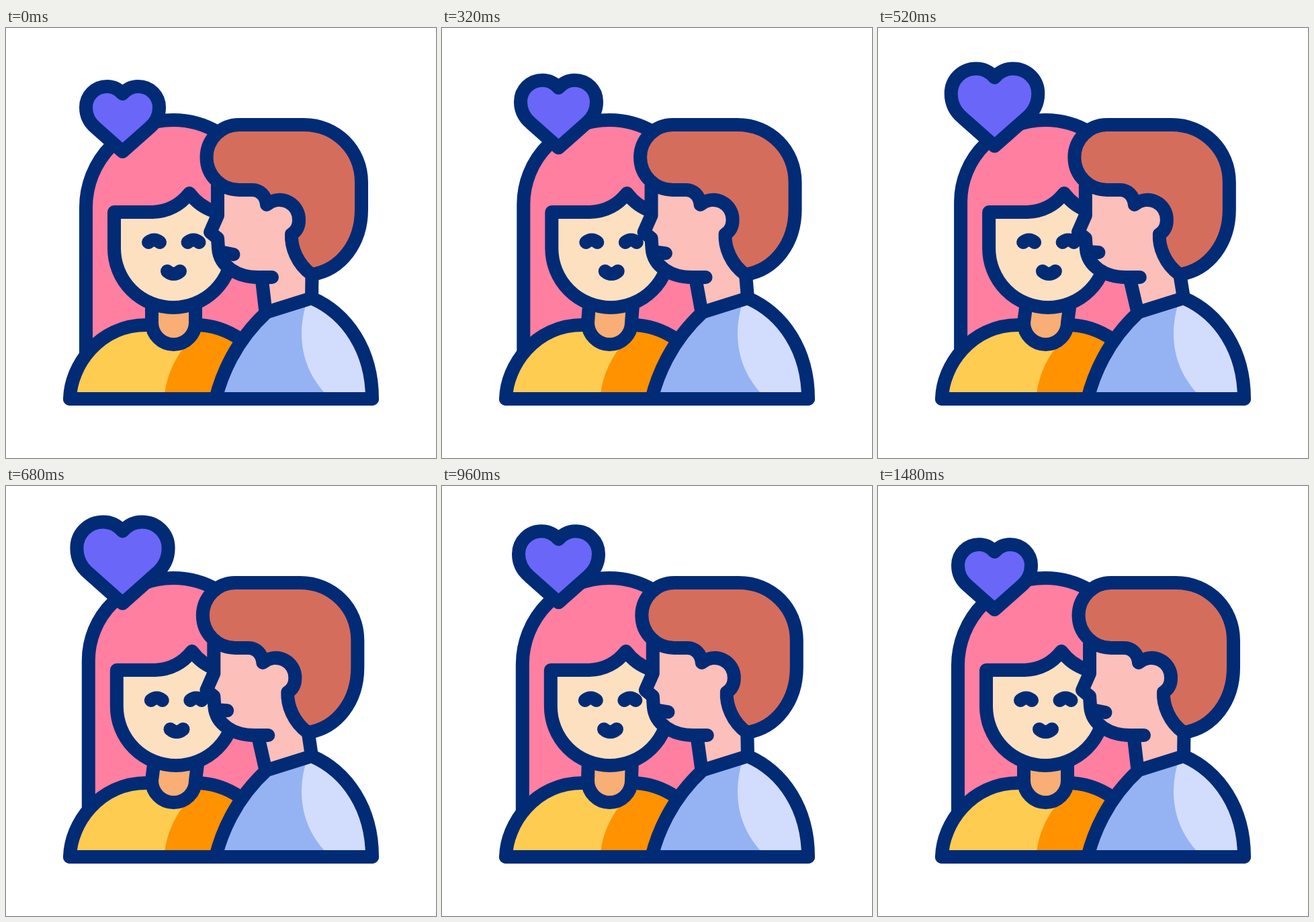
Write an HTML page with a canvas that moves like this. It is 640x640 px and loops after 1.64 s.

```html
<!DOCTYPE html>
<html lang="en">
<head>
<meta charset="utf-8">
<title>Couple</title>
<style>
html, body { margin: 0; overflow: hidden; background: #fff; }
canvas { display: block; }
</style>
</head>
<body>
<canvas width="640" height="640"></canvas>
<script>
const LOOP = 1640;
const ctx = document.querySelector('canvas').getContext('2d');

const HEART = new Path2D(`M0-86 C-6-93-14-97-23-97 C-41-97-54.5-83-54.5-66
  C-54.5-53-49-43-40-35.5 L0 0 L40-35.5 C49-43 54.5-53 54.5-66
  C54.5-83 41-97 23-97 C14-97 6-93 0-86Z`);
const SHIRT = 'M95 552 C96 503 138 442 209 442 H282 C308 442 330 450 350 464';
const FACE = `M161 274 H218 C245 273 262 260 273 246 C282 258 295 268 310 273
  L337 328 A88 88 0 0 1 161 328Z`;
const NOSE_AND_CHIN = 'L304 304 L315 313 L316 328 C318 355 345 371 375 371 H396';
const EAR = 'C433 351 424 326 425 307 C433 302 436 294 436 286 A29 29 0 0 0 388 263';
const MAN_HAIR = `M347 241 A48.5 48.5 0 0 1 347 144 H443 C492 144 529 182 529 230
  V270 C529 320 499 360 455 367 ${EAR} C387 249 377 241 367 241Z`;
const JACKET = `M312 552 C320 519 340 467 388 423 L455 402
  C508 425 545 480 545 552Z`;

const ease = x => (1 - Math.cos(Math.PI * Math.min(1, Math.max(0, x)))) / 2;
// Rises from start to peak, then returns to zero at end.
const pulse = (t, start, peak, end) =>
  t < peak ? ease((t - start) / (peak - start)) : ease((end - t) / (end - peak));

const path = d => d instanceof Path2D ? d : new Path2D(d);
function fill(d, color) {
  ctx.fillStyle = color;
  ctx.fill(path(d));
}
function line(d) {
  ctx.stroke(path(d));
}
function shape(d, color) {
  fill(d, color);
  line(d);
}
function shifted(dx, draw) {
  ctx.save();
  ctx.translate(dx, 0);
  draw();
  ctx.restore();
}

function drawWoman(lean) {
  const dx = 4.2 * lean;
  const hair = `M${119 + dx} 485 V${267 - 2 * dx} A${130 - dx} ${130 - 2 * dx} 0 0 1 249 137
    A130 130 0 0 1 316 155.6`;
  fill(hair + 'L382 300 V480Z', '#ff7fa1');
  line(hair);

  fill(SHIRT + 'L312 552Z', '#ffcc52');
  fill('M236 546 C239 518 252 490 268 472 L282 442 C308 442 330 450 350 464 L312 546Z', '#ff9200');
  line(SHIRT);
  shape(`M${217 + dx} 408 L217 438.5 A32.5 32.5 0 0 0 282 438.5 L${282 + dx} 408`, '#f8ae74');

  shifted(dx, () => {
    shape(FACE, '#fde0bf');
    line('M212 319 Q220.5 312 229 319 M270.5 319 Q279 312 287.5 319');
  });
  shifted(5 * lean, () => line('M240 362 Q249.5 370 259 362'));
}

function drawHeart(t) {
  const scale = 1 + 0.25 * pulse(t, 200, 680, 1160);
  const tip = 184 - 20 * pulse(t, 40, 720, 1420) + 42 * (scale - 1);
  const heart = new Path2D();
  heart.addPath(HEART, new DOMMatrix([scale, 0, 0, scale, 173.5, tip]));
  shape(heart, '#6a66f8');
}

function drawMan(lean) {
  const dx = -6.3 * lean;
  const neckLeft = `M${380.5 + dx} 371 L386.5 423`;
  const neckRight = `L455 402 L${455.5 + dx} 367`;
  fill(neckLeft + neckRight + 'Z', '#fcbfba');
  line(neckLeft + neckRight.replace('L', 'M'));

  shifted(dx, () => {
    fill(`M315 235 V279 ${NOSE_AND_CHIN} L455 367 ${EAR} L367 241Z`, '#fcbfba');
    line(`M315 235 V279 ${NOSE_AND_CHIN}`);
    line(`M318 333 L${338.5 - 4 * lean} ${337 - 3 * lean}`);
    shape(MAN_HAIR, '#d56d5d');
  });

  fill(JACKET, '#95b2f3');
  fill('M446 413 C434 455 438 504 475 544 H545 C545 480 508 425 455 402Z', '#d2dcfd');
  line(JACKET);
}

function draw(t) {
  const lean = pulse(t, 40, 570, 1120);
  ctx.clearRect(0, 0, 640, 640);
  ctx.lineWidth = 20;
  ctx.lineCap = ctx.lineJoin = 'round';
  ctx.strokeStyle = '#022b76';
  drawWoman(lean);
  drawHeart(t);
  drawMan(lean);
  line('M95 552 H545');
}

const start = performance.now();
function tick() {
  draw((performance.now() - start) % LOOP);
  requestAnimationFrame(tick);
}
tick();
</script>
</body>
</html>
```
